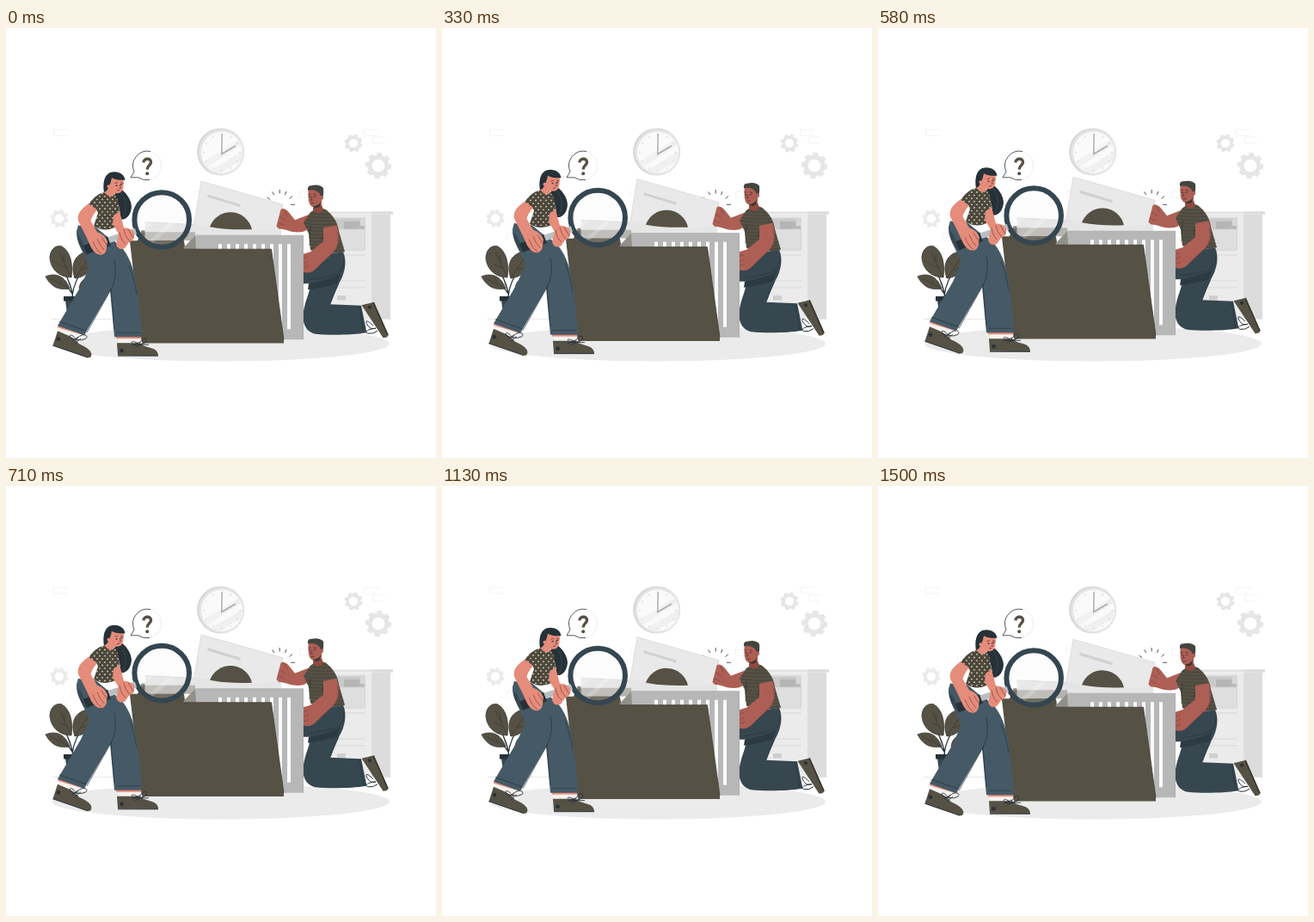
An HTML page with a canvas that plays this animation: 500x500 px, repeating every 1540 ms.

```html
<!DOCTYPE html>
<html lang="en">
<head>
<meta charset="utf-8">
<title>Searching the folder</title>
<style>
html, body { margin: 0; width: 100%; height: 100%; overflow: hidden; background: #fff; }
canvas { display: block; width: 500px; height: 500px; }
</style>
</head>
<body>
<canvas id="stage" width="500" height="500"></canvas>
<script>
const ctx = document.getElementById('stage').getContext('2d');
const LOOP = 1540, PEAK = 730, LIFT = 5.4;
const INK = '#263238', OLIVE = '#565145', SKIN = '#e58c7b', TAN = '#ad5f55';
const DENIM = '#455a66', NAVY = '#37474f';

function fill(d, color) {
  ctx.fillStyle = color;
  ctx.fill(new Path2D(d));
}

function line(d, color, width = 1) {
  ctx.strokeStyle = color;
  ctx.lineWidth = width;
  ctx.stroke(new Path2D(d));
}

function rect(x, y, w, h, color) {
  ctx.fillStyle = color;
  ctx.fillRect(x, y, w, h);
}

function oval(x, y, rx, ry, color) {
  ctx.fillStyle = color;
  ctx.beginPath();
  ctx.ellipse(x, y, rx, ry, 0, 0, Math.PI * 2);
  ctx.fill();
}

const disc = (x, y, r, color) => oval(x, y, r, r, color);

function ring(x, y, r, color, width) {
  ctx.strokeStyle = color;
  ctx.lineWidth = width;
  ctx.beginPath();
  ctx.arc(x, y, r, 0, Math.PI * 2);
  ctx.stroke();
}

function clipped(d, draw) {
  ctx.save();
  ctx.clip(new Path2D(d));
  draw();
  ctx.restore();
}

function gear(x, y, r, color, turn) {
  ctx.save();
  ctx.translate(x, y);
  ctx.rotate(turn);
  ring(0, 0, r * 0.66, color, r * 0.34);
  for (let i = 0; i < 8; i++) {
    ctx.rotate(Math.PI / 4);
    rect(-r * 0.2, -r, r * 0.4, r * 0.3, color);
  }
  ctx.restore();
}

function clock() {
  disc(249.5, 144, 27.5, '#d9d9d9');
  disc(251, 144.5, 26.3, '#e6e6e6');
  disc(251, 144.7, 24, '#fafafa');
  clipped('M227 144.7a24 24 0 1 0 48 0a24 24 0 1 0-48 0', () => {
    line('M225 163L272 133', '#f2f2f2', 7);
    line('M239 170L280 145', '#f0f0f0', 8);
  });
  for (let i = 0; i < 12; i++) {
    const a = i * Math.PI / 6, c = Math.cos(a), s = Math.sin(a);
    line(`M${251 + 20 * c} ${144.7 + 20 * s}L${251 + 22 * c} ${144.7 + 22 * s}`, '#c4c4c4', 0.8);
  }
  line('M250.8 147L251.2 123', '#aaa', 1.4);
  line('M250 147L267 137', '#aaa', 1.6);
}

function bubble() {
  fill('M148 167A17 17 0 1 1 154 174L145 174Z', '#fff');
  line('M168 143.5A17 17 0 0 0 149 167L145 173.8L154 173.8A17 17 0 0 0 167 176.5', INK, 0.8);
  ctx.setLineDash([1, 2]);
  line('M168 143.5A17 17 0 0 1 167 176.5', '#aaa', 0.6);
  ctx.setLineDash([]);
  line('M159.9 156.4C160 150.8 169 151 168.5 156.3C168.2 159.7 164.2 159.8 164.2 164.5', OLIVE, 3.4);
  disc(164.2, 169.2, 2, OLIVE);
}

function cabinet() {
  rect(378, 217, 47, 121, '#ebebeb');
  rect(425, 217, 22, 121, '#dcdcdc');
  rect(373, 213.5, 77, 3, '#e2e2e2');
  rect(425, 213.5, 25, 3, '#dcdcdc');
  rect(378, 220, 40, 38, '#d8d8d8');
  rect(382, 222, 30, 20, '#c9c9c9');
  rect(393, 225, 18, 12, '#b5b5b5');
  rect(409, 230, 8, 6, '#b9b9b9');
  fill('M378 234H418V258H378Z', '#dedede');
  line('M378 234H417.5V258.5H378M378 264H418M378 294H418M378 302H418', '#d0d0d0', 0.7);
  rect(385, 311, 10, 5.5, '#cfcfcf');
}

function plant() {
  line('M78 315C77 301 71 290 66 279M77 312C78 299 84 289 91 277M77 309C73 301 66 297 58 293', INK, 1.2);
  const edge = '#38382f';
  const leaves = [
    'M76 290C60 290 51 278 51 266C52 256 59 252 65 254C75 260 78 274 76 290Z',
    'M80 291C75 277 79 265 91 261C98 258 102 263 102 270C100 283 91 290 80 291Z',
    'M74 303C62 305 53 302 46 289C55 285 68 286 74 303Z',
    'M85 303C86 295 90 291 98 289V302Z'
  ];
  for (const d of leaves) {
    fill(d, OLIVE);
    line(d, edge, 0.8);
  }
  line('M76 290L62 261M80 291L97 266M74 303L51 291M71 279L61 275M68 272L67 264M87 281L95 279M65 297L60 290', edge, 0.7);
  fill('M69 317H95L92 338H72Z', NAVY);
  rect(67, 312, 31, 5.5, INK);
}

function scenery() {
  rect(0, 0, 500, 500, '#fff');
  line('M73 118H55.5V125H72M434 118H416.5V125H432M441 127H426.5V134H440M358 190H341.5V197H356M236 190H219V197M91 239H75V247', '#f0f0f0', 0.8);
  gear(404, 134, 10.5, '#e6e6e6', 0.3);
  gear(433, 160, 15, '#e6e6e6', 0.1);
  gear(62, 221.5, 10.5, '#ebebeb', 0.3);
  clock();
  cabinet();
  line('M53 338.5H447', '#ddd', 0.7);
  oval(250, 367, 196, 20.5, '#ebebeb');
  plant();
  bubble();
  line('M303.5 197L307 199.5M309.5 190.5L312 194M318.2 188V192.5M326 190L324.5 194M333 195.5L329.5 198.5M336 205.3H331', '#555', 1);
}

function papers() {
  fill('M157.5 235H205L209 260H148Z', OLIVE);
  rect(161.5, 235, 60, 12, '#b5b3ae');
  fill('M161.5 225.5L230 229L286 234L320 233V246H220V237H161.5Z', '#e5e5e5');
  line('M161.5 225.5L230 229L286 234L320 233', '#cfcfcf', 0.7);
  fill('M227 178L322 205L315 233.5L288 235L218.5 228.5Z', '#e9e9e9');
  line('M218.5 228.5L227 178L322 205L317 229', '#d4d4d4', 0.7);
  line('M234.5 195L272.5 206.5', '#d0d0d0', 3);
  fill('M237 231A25.6 25.6 0 0 1 286 234Q260 235 237 231Z', OLIVE);
}

function man() {
  // Legs and shoe
  fill('M413.5 322L428 318.5L444.5 356.5Q444 360 438.5 360Z', OLIVE);
  line('M427 319L444 357', '#36362f', 1.5);
  disc(423, 324.5, 2, INK);
  line('M427 346C418 337 417 341 421 346Q424 351 430 349C419 350 417 354 421 355Q427 356 432 352', INK, 1);
  fill('M345 297V282L372 263L392 260C397 271 394 286 387 297L377 321L413 322.5L419.5 354C401 357 374 357 360 355.5C347 353 344 340 346 329C348 316 353 309 354 297Z', NAVY);
  line('M411 323L416 354', INK, 0.7);
  fill('M352 297Q380 292 389 285L385 297Q366 302 351 304Z', '#2c3a42');
  line('M393 269Q394 286 374 289L352 293M387 297Q381 307 377 321', INK, 0.6);

  // Reaching arm
  fill('M354 216L336 223L328 213Q322 208 319.5 211L314.5 230C316 235 323 233 327 235C335 238 344 238 349 235L361 222Z', TAN);
  line('M318 219L325 223M316 226L323 229M324 212L327 219', '#80443e', 0.7);

  // Torso
  const shirt = 'M354 214C361 209 366 208 372 211C380 217 386 226 387 236L394 260Q376 264 354 258L352 239L346 226Z';
  fill(shirt, OLIVE);
  clipped(shirt, () => {
    for (let y = 210; y < 264; y += 4) line(`M344 ${y}Q370 ${y + 5} 396 ${y}`, '#3d3d34', 0.6);
  });
  line('M354 229L353 253M371 232L367 246', '#33342d', 0.7);

  // Head
  fill('M357 205H367L369 212Q362 218 357 211Z', '#91483f');
  fill('M351.5 191Q351 185 356 184L368 187L367 204Q363 210 357 208Q351.5 206 351.5 196Z', TAN);
  fill('M351 188.5Q350 183 355 183Q365 181 369 186Q370 196 366.5 200L365 193Q361 187 351 188.5Z', '#43453e');
  disc(366.8, 197, 2.3, TAN);
  disc(353.5, 196, 0.8, INK);
  disc(359, 196, 0.8, INK);
  line('M351.5 193.4L354.5 193M357.5 193L361 194M356 196L354.5 200H356.5M354.5 203.5H358.5', '#542e2b', 0.8);
  fill('M357 207Q363 207 366 202L365 207Q361 211 357 207Z', '#34372f');

  // Supporting arm
  fill('M369 232L384.5 229C389 244 387 254 381 260L360 280Q353 287 344 283V263L354 260L369 248Z', TAN);
  line('M385 237Q389 250 381 260L364 276M345 268L351 266M345 274L352 271M346 279L352 277', '#80443e', 0.7);
}

function folder() {
  fill('M205 257L220 241H346V362H205Z', '#b7b7b7');
  fill('M205 257L220 241L221 257Z', '#918f89');
  for (let x = 247; x < 330; x += 10) rect(x, 251, 4, 99, '#fafafa');
  line('M220 241H345.5V362', '#adadad', 0.8);
  fill('M144 248Q144 247 146 247H203L207 257H308.5L323 362V366.3H160Q158 366.3 157.5 363Z', OLIVE);
  line('M207 257H308.5L323 362', '#403c33', 0.8);
}

function magnifier() {
  disc(181.2, 222.8, 31, 'rgba(235,235,235,.18)');
  clipped('M151 223a30 30 0 1 0 60 0a30 30 0 1 0-60 0', () => {
    line('M155 235L199 195', 'rgba(255,255,255,.2)', 10);
    line('M168 249L212 210', 'rgba(255,255,255,.2)', 5);
  });
  ring(181.2, 222.8, 31.8, '#344650', 6);
  line('M118 247L151 236', '#b9c0c3', 7);
  line('M92 258L120 247.5', INK, 11);
}

function shoes() {
  fill('M63 343L92 354L87 363L60 355Z', '#f6f2ef');
  fill('M61 344L91 354L90 357L60 348Z', SKIN);
  fill('M60 352L74 358Q81 362 85 367Q99 373 99.5 379Q99 384 95 383L54.5 369Z', OLIVE);
  line('M54.5 369L95 383', INK, 1);
  disc(61, 361.5, 2.3, INK);
  line('M77 364L84 359M80 367L87 361M82 362C87 354 97 356 93 361Q88 364 82 362C75 354 73 357 75 360L83 363', INK, 0.9);
  fill('M130 357H157V366H130Z', '#f6f2ef');
  rect(128, 358, 29, 3, SKIN);
  fill('M129 366L153 366Q161 370 169 372Q177 374 177 381L130 380.5Z', OLIVE);
  line('M130 381H177', INK, 1);
  disc(134.5, 375, 2.3, INK);
  line('M146 369L156 365M150 371L160 366M155 367C160 358 165 359 163 365Q159 369 154 367C146 362 144 365 149 368L166 368', INK, 0.9);
}

function woman() {
  // Hair and legs
  fill('M130 185C140 190 146 200 146 208C145 219 138 224 132.5 222C134 211 129 201 126 194Z', INK);
  line('M133 190Q144 205 136 221', '#45515a', 0.6);
  shoes();
  fill('M101 237L122 244L129 250C139 257 147 273 150 290C154 310 157 336 158 359L126 359L121 305L109 282Z', DENIM);
  line('M128 354H156M143 276Q149 290 152 310', INK, 0.6);
  fill('M84 229Q92 232 104 231L122 246C129 264 130 288 122 304L91 357L60 346L87 300L97 277C91 262 81 249 82 236Z', DENIM);
  line('M62 341L93 352M94 354L122 304Q130 290 126 269M122 303L126 350', INK, 0.7);
  fill('M83 240Q91 246 93 264Q82 249 83 240Z', NAVY);

  // Shirt
  const shirt = 'M95 206Q104 193 113 191L122 191Q130 195 131 204L132 215L125 220L128 231Q114 238 102 230L107 215L105 211Z';
  fill(shirt, '#4c483e');
  clipped(shirt, () => {
    for (let row = 0; row < 13; row++)
      for (let col = 0; col < 8; col++)
        disc(94 + col * 6 + (row % 2) * 3, 192 + row * 3.6, 0.85, '#eee0b8');
  });

  // Far arm holding the magnifier
  magnifier();
  fill('M125 218L132 213L137 232Q146 232 149 238Q151 246 143 249L138 256Q130 259 128 251L131 239L124 228Z', SKIN);
  line('M132 237Q134 248 139 251M137 234Q138 242 144 248M142 234L148 244', '#8b4941', 0.8);

  // Head
  fill('M116 183L127 188L125 195Q119 197 115 191Z', SKIN);
  fill('M117 177Q122 170 137 176L136.5 184Q136 191 130 192Q123 192 118 188Z', SKIN);
  fill('M114 191C112 178 115 167 126 167C133 167 138 171 138.5 176.5Q128 177 123 174Q121 184 117 189Z', INK);
  disc(119.5, 184, 2, SKIN);
  disc(128.5, 183, 0.9, INK);
  disc(134, 182, 0.9, INK);
  line('M126.5 180.5L130 179.5M133 179.5L136.5 180.5M132 182L133.5 186H131.5M129 188.8L132 188.3', '#6e3934', 0.8);

  // Near arm
  fill('M96 204L106 211Q100 218 98.5 224L106 237Q115 240 118 248L117 255Q117 262 111 263.5Q104 264 99 255L94 244L84 224C82 215 89 209 96 204Z', SKIN);
  line('M101 248Q106 260 111 262M106 245Q109 253 114 258M111 243L117 252', '#8b4941', 0.8);
}

function frame(now) {
  const phase = (now % LOOP - PEAK) / LOOP * Math.PI * 2;
  const rise = LIFT * (1 + Math.cos(phase)) / 2;
  scenery();
  ctx.save();
  ctx.translate(0, 0.2 - rise);
  papers();
  man();
  folder();
  woman();
  ctx.restore();
  requestAnimationFrame(frame);
}

ctx.lineJoin = 'round';
requestAnimationFrame(frame);
</script>
</body>
</html>
```
